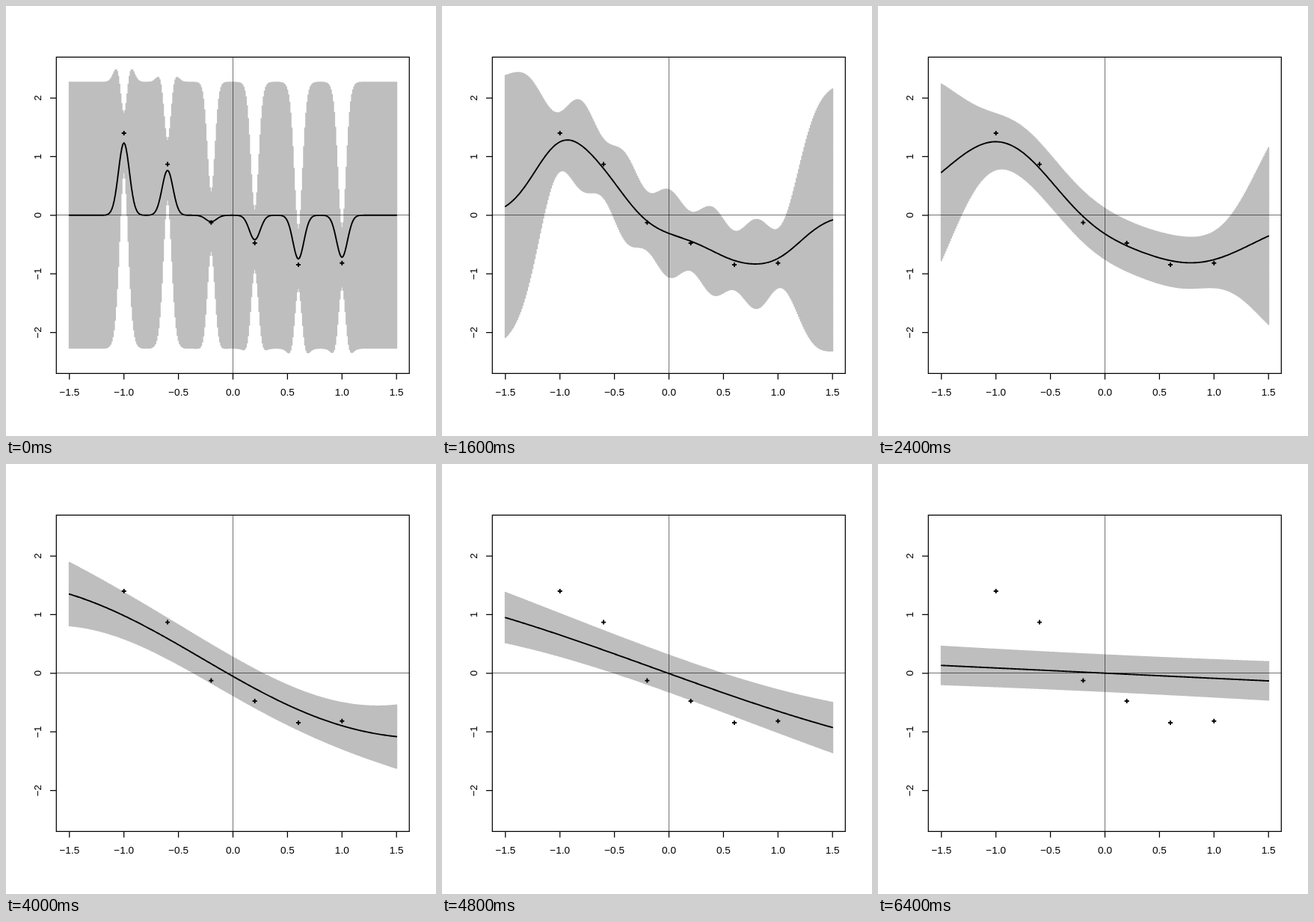
Animation of 575x575 px, one loop 7.2 s. Source, as an HTML page with a canvas:

```html
<!DOCTYPE html>
<html lang="en">
<head>
<meta charset="utf-8">
<title>Gaussian process regression by length scale</title>
<style>
  html, body { margin: 0; width: 100%; height: 100%; overflow: hidden; background: #fff; }
  canvas { display: block; width: 575px; height: 575px; }
</style>
</head>
<body>
<canvas id="plot" width="575" height="575"></canvas>
<script>
const ctx = document.getElementById('plot').getContext('2d');

const STEP_MS = 800;
const SCALES = [0.05, 0.1, 0.25, 0.5, 1, 2, 4, 8, 16];
const NOISE = Math.exp(-2);
const DATA_X = [-1, -0.6, -0.2, 0.2, 0.6, 1];
const DATA_Y = [1.4, 0.87, -0.125, -0.475, -0.845, -0.815];
const GRID = Array.from({ length: 301 }, (_, i) => -1.5 + i / 100);
const BOX = { left: 67.3, top: 68.3, right: 539.3, bottom: 491.3 };

const px = x => 303.5 + 145.8 * x;
const py = y => 279.8 - 78.4 * y;
const dot = (a, b) => a.reduce((sum, v, i) => sum + v * b[i], 0);

// Gauss-Jordan inverse of a positive definite matrix
function invert(matrix) {
  const n = matrix.length;
  const rows = matrix.map((row, i) => [...row, ...row.map((_, j) => (i === j ? 1 : 0))]);
  for (let c = 0; c < n; c++) {
    const pivot = rows[c][c];
    rows[c] = rows[c].map(v => v / pivot);
    for (let r = 0; r < n; r++) {
      if (r === c) continue;
      const factor = rows[r][c];
      rows[r] = rows[r].map((v, j) => v - factor * rows[c][j]);
    }
  }
  return rows.map(row => row.slice(n));
}

// Predictive mean and band half-width (twice the variance) on the grid
function predict(scale) {
  const kernel = (a, b) => Math.exp(-((a - b) ** 2) / (2 * scale * scale));
  const cov = DATA_X.map((a, i) =>
    DATA_X.map((b, j) => kernel(a, b) + (i === j ? NOISE : 0)));
  const inverse = invert(cov);
  return GRID.map(x => {
    const k = DATA_X.map(d => kernel(x, d));
    const weights = inverse.map(row => dot(row, k));
    return { x, mean: dot(weights, DATA_Y), half: 2 * (1 + NOISE - dot(weights, k)) };
  });
}

const fits = SCALES.map(predict);

function strokePath(color, width, build) {
  ctx.strokeStyle = color;
  ctx.lineWidth = width;
  ctx.beginPath();
  build();
  ctx.stroke();
}

function segment(x1, y1, x2, y2) {
  ctx.moveTo(x1, y1);
  ctx.lineTo(x2, y2);
}

function drawFit(fit) {
  ctx.lineCap = 'butt';
  strokePath('#bebebe', 2, () => {
    for (const { x, mean, half } of fit) {
      segment(px(x), py(mean + half) - 0.5, px(x), py(mean - half) + 0.5);
    }
  });
  ctx.lineCap = ctx.lineJoin = 'round';
  strokePath('#000', 1.9, () => {
    for (const { x, mean } of fit) ctx.lineTo(px(x), py(mean));
  });
  ctx.lineCap = 'butt';
  ctx.lineJoin = 'miter';
}

function drawZeroLines() {
  strokePath('rgba(0,0,0,0.55)', 1, () => {
    segment(BOX.left, 279.5, BOX.right, 279.5);
    segment(303.5, BOX.top, 303.5, BOX.bottom);
  });
}

function drawPoints() {
  strokePath('#000', 1.9, () => {
    DATA_X.forEach((d, i) => {
      const x = px(d), y = py(DATA_Y[i]);
      segment(x - 3, y, x + 3, y);
      segment(x, y - 3, x, y + 3);
    });
  });
}

function drawAxes() {
  const xTicks = [-1.5, -1, -0.5, 0, 0.5, 1, 1.5];
  const yTicks = [-2, -1, 0, 1, 2];
  strokePath('#000', 1.25, () => {
    ctx.rect(BOX.left, BOX.top, BOX.right - BOX.left, BOX.bottom - BOX.top);
    for (const t of xTicks) segment(px(t), BOX.bottom, px(t), 499.5);
    for (const t of yTicks) segment(BOX.left, py(t), 59, py(t));
  });

  ctx.fillStyle = '#000';
  ctx.font = '13.6px "Liberation Sans", Arial, sans-serif';
  ctx.textAlign = 'center';
  const label = text => text.replace('-', '\u2212');
  for (const t of xTicks) ctx.fillText(label(t.toFixed(1)), px(t), 521);
  for (const t of yTicks) {
    ctx.save();
    ctx.translate(47, py(t));
    ctx.rotate(-Math.PI / 2);
    ctx.fillText(label(String(t)), 0, 0);
    ctx.restore();
  }
}

function draw(step) {
  ctx.fillStyle = '#fff';
  ctx.fillRect(0, 0, 575, 575);
  drawFit(fits[step]);
  drawZeroLines();
  drawPoints();
  drawAxes();
}

const start = performance.now();
let shown = -1;

function tick() {
  const elapsed = performance.now() - start;
  const step = Math.floor(elapsed / STEP_MS) % SCALES.length;
  if (step !== shown) draw(shown = step);
  requestAnimationFrame(tick);
}
tick();
</script>
</body>
</html>
```
